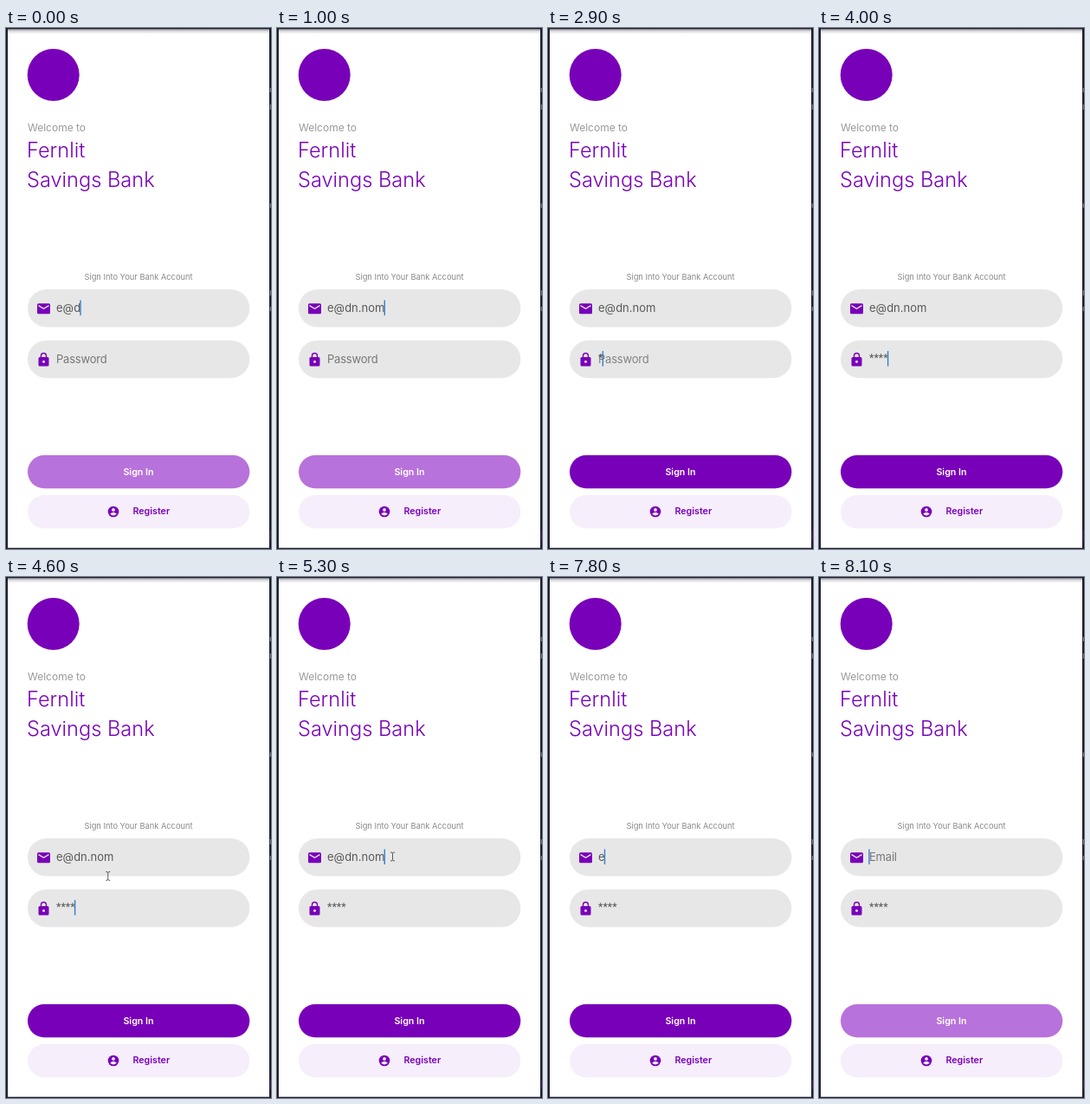
Write an HTML page that moves like this. It is 306 px wide and 600 px high and loops after 8.3 s.

```html
<!DOCTYPE html>
<html lang="en">
<head>
<meta charset="utf-8">
<title>Sign in</title>
<style>
  html, body { margin: 0; width: 100%; height: 100%; overflow: hidden; background: #fff; }
  svg { display: block; width: 306px; height: 600px; }
  text { font-family: Inter, "Open Sans", sans-serif; white-space: pre; }
  .brand { fill: #7800b9; }
  .title { font-size: 23.6px; font-weight: 350; }
  .field { fill: #e7e7e7; }
  .typed { font-size: 13px; fill: #585858; }
  .hint { font-size: 13px; fill: #777; letter-spacing: -.2px; }
  .stars { font-family: Roboto, sans-serif; font-size: 12.6px; }
  .label { font-size: 10.7px; font-weight: 600; text-anchor: middle; }
</style>
</head>
<body>
<svg viewBox="0 0 306 600">
  <defs>
    <linearGradient id="shade" x1="0" y1="0" x2="0" y2="1">
      <stop offset="0" stop-color="#777783"/>
      <stop offset=".4" stop-color="#d8d8dc"/>
      <stop offset="1" stop-color="#fff"/>
    </linearGradient>
  </defs>

  <!-- window edge -->
  <rect width="306" height="600" fill="#1c1d2b"/>
  <rect x="2" y="1" width="302" height="597.7" fill="#fff"/>
  <rect x="2" y="1" width="302" height="6" fill="url(#shade)"/>
  <path d="M305.3 69v5M305.3 88v6M305.3 202v5M305.3 302v6M305.3 321v5" stroke="#8d8e98"/>
  <path d="M305.3 579v11" stroke="#4c2466"/>

  <!-- heading -->
  <circle class="brand" cx="54.7" cy="54" r="30"/>
  <text x="25" y="119.3" font-size="12" fill="#999">Welcome to</text>
  <text class="brand title" x="24" y="149">Fernlit</text>
  <text class="brand title" x="24" y="183">Savings Bank</text>
  <text x="153" y="290.3" font-size="9.3" fill="#8a8a8a" text-anchor="middle">Sign Into Your Bank Account</text>

  <!-- email -->
  <rect class="field" x="25" y="301" width="256.3" height="43.5" rx="21.7"/>
  <rect class="brand" x="36" y="317.3" width="15" height="12" rx="1.5"/>
  <path d="M37.5 319.6l6 3.75 6-3.75" fill="none" stroke="#e7e7e7" stroke-width="1.3"/>
  <text class="hint" id="emailHint" x="58" y="327.3">Email</text>
  <text class="typed" id="email" x="58" y="326.5"></text>

  <!-- password -->
  <rect class="field" x="25" y="359.7" width="256.3" height="43.5" rx="21.7"/>
  <rect class="brand" x="37.5" y="379" width="12" height="10.5" rx="1.5"/>
  <path d="M40.5 380v-2.5a3 3 0 0 1 6 0v2.5" fill="none" stroke="#7800b9" stroke-width="1.4"/>
  <circle class="field" cx="43.5" cy="384.2" r="1.5"/>
  <text class="hint" id="passHint" x="58" y="385.5">Password</text>
  <text class="typed stars" id="pass" x="58" y="384.3"></text>

  <rect id="caret" width="1.4" height="17.5" fill="#3580cc"/>

  <!-- buttons -->
  <rect id="signIn" x="25" y="492" width="256.3" height="38.3" rx="19.1"/>
  <text class="label" x="153" y="514.8" fill="#fff">Sign In</text>
  <rect x="25" y="538" width="256.3" height="38.3" rx="19.1" fill="#f6eefb"/>
  <circle class="brand" cx="124" cy="557" r="6.3"/>
  <circle cx="124" cy="554.9" r="1.9" fill="#f6eefb"/>
  <path d="M120.2 559.5q3.8-3.6 7.6 0q-3.8 4.2-7.6 0z" fill="#f6eefb"/>
  <text class="label brand" x="167.8" y="560.3">Register</text>

  <path id="beam" d="M-2.5-5Q0-5 0-3.8V3.8Q0 5-2.5 5M2.5-5Q0-5 0-3.8M0 3.8Q0 5 2.5 5"
        fill="none" stroke="#4a4a4a" stroke-width=".9"/>
</svg>
<script>
  const LOOP = 8300, TICK = 100;
  const ADDRESS = 'e@dn.nom';

  // [time, characters shown]
  const emailSteps = [[0, 3], [100, 4], [500, 5], [700, 6], [800, 7], [1000, 8],
    [5600, 7], [5900, 6], [6200, 5], [6500, 4], [6800, 3], [7200, 2], [7600, 1], [7900, 0]];
  const passSteps = [[0, 0], [2800, 1], [3300, 2], [3600, 3], [3900, 4]];

  const upper = [133.5, 322], lower = [93.5, 379];
  const moves = [
    { start: 1600, arrive: 2000, hide: 2800, from: upper, to: lower },
    { start: 4200, arrive: 4900, hide: 5600, from: lower, to: upper }
  ];

  const $ = id => document.getElementById(id);
  const email = $('email'), pass = $('pass'), caret = $('caret'), beam = $('beam');
  const clamp = v => Math.min(1, Math.max(0, v));
  const ease = p => p * p * (3 - 2 * p);
  const stepAt = (steps, t) => steps.filter(s => s[0] <= t).pop()[1];

  function drawBeam(t) {
    const m = moves.find(m => t >= m.start && t < m.hide);
    beam.style.visibility = m ? 'visible' : 'hidden';
    if (!m) return;
    const p = ease(clamp((t - m.start) / (m.arrive - m.start)));
    const [x, y] = m.from.map((v, i) => v + (m.to[i] - v) * p);
    beam.setAttribute('transform', `translate(${x} ${y})`);
  }

  function draw(t) {
    email.textContent = ADDRESS.slice(0, stepAt(emailSteps, t));
    pass.textContent = '*'.repeat(stepAt(passSteps, t));

    $('emailHint').style.opacity = clamp((t - 7900) / 200);
    const fade = clamp((t - 2800) / 300);
    $('passHint').style.opacity = 1 - fade * fade;

    const inPass = t >= 2000 && t < 5000;
    const active = inPass ? pass : email;
    const width = active.textContent ? active.getComputedTextLength() : 0;
    caret.setAttribute('x', 57.2 + width);
    caret.setAttribute('y', inPass ? 372 : 313.5);

    const ready = t >= 2800 && t < 7900;
    $('signIn').setAttribute('fill', ready ? '#7800b9' : '#b872db');
    drawBeam(t);
  }

  const began = performance.now();
  function frame() {
    const t = (performance.now() - began) % LOOP;
    draw(Math.floor(t / TICK) * TICK);
    requestAnimationFrame(frame);
  }
  frame();
</script>
</body>
</html>
```
